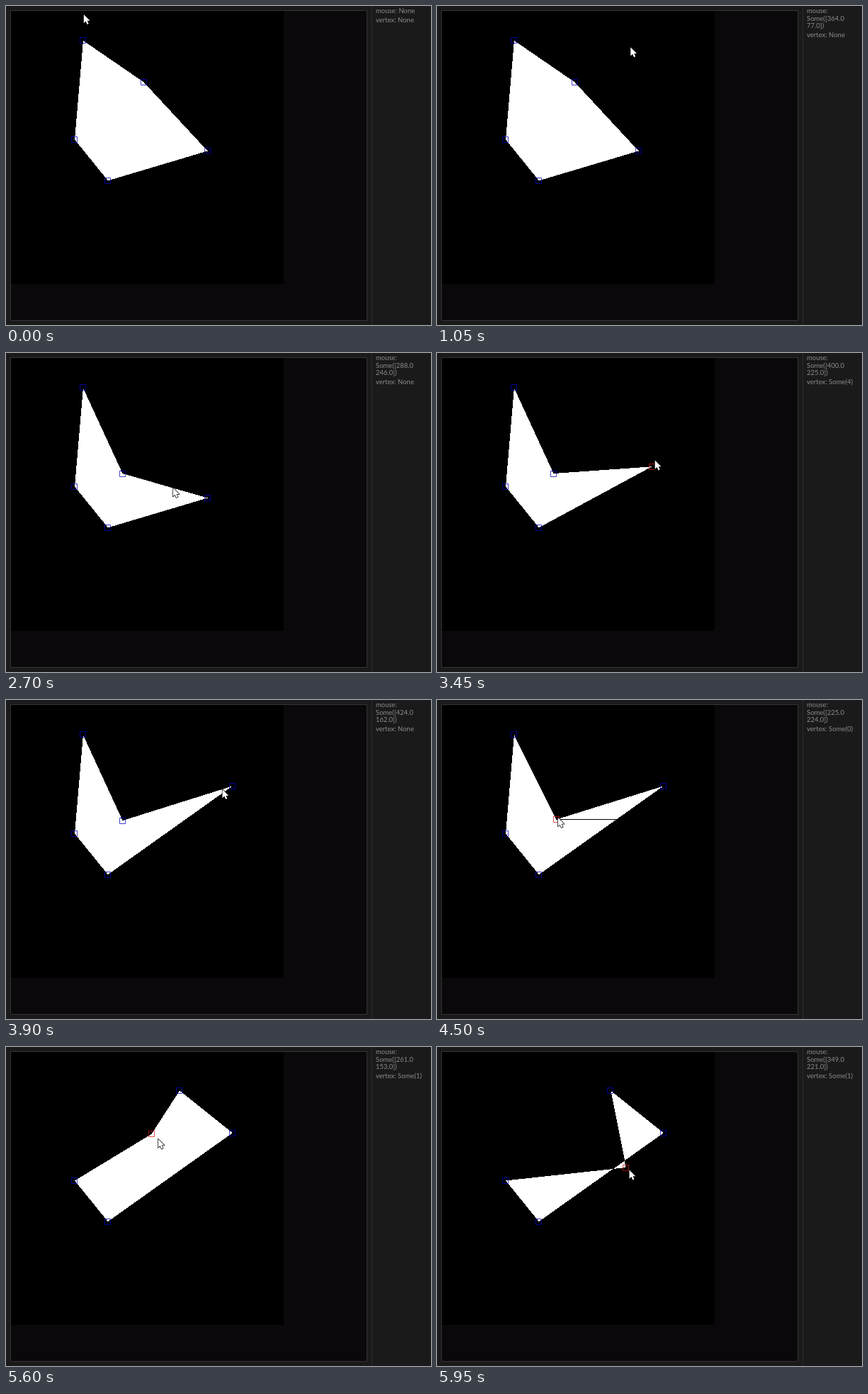
Write an HTML page with a canvas that moves like this. It is 600 by 450 pixels and loops after 6000 ms.

```html
<!DOCTYPE html>
<html lang="en">
<head>
<meta charset="utf-8">
<title>Polygon editor</title>
<style>
  html, body { margin: 0; width: 100%; height: 100%; overflow: hidden; background: #1b1a1b; }
  canvas { display: block; width: 600px; height: 450px; }
</style>
</head>
<body>
<canvas id="stage" width="600" height="450"></canvas>
<script>
const ctx = document.getElementById('stage').getContext('2d');
const LOOP = 6000, STEP = 50;
const VERTEX_LAG = 40, TEXT_LAG = 80;
const TEXT_START = 1050;
const UNIT = 0.75; // stage pixels per logical pixel

const CORNERS = [[195, 107], [109, 48], [97, 188], [144, 246], [285, 204]];
const HOME = [109.5, 11.5];

const linear = p => p;
const easeIn = p => p * p;
const easeOut = p => p * (2 - p);
const easeBoth = p => p * p * (3 - 2 * p);

// Pointer gestures; "grab" names the corner dragged along
const MOVES = [
  { at: 300, dur: 350, to: [210.5, 61.5], ease: easeBoth },
  { at: 760, dur: 90, to: [250, 71], ease: linear },
  { at: 951, dur: 15, to: [273, 57.75], ease: linear },
  { at: 1200, dur: 650, to: CORNERS[0], ease: easeBoth },
  { at: 1950, dur: 440, to: [165, 169.5], ease: easeIn, grab: 0 },
  { at: 2450, dur: 700, to: CORNERS[4], ease: easeOut },
  { at: 3250, dur: 500, to: [320, 121], ease: easeOut, grab: 4 },
  { at: 3780, dur: 620, to: [168.75, 168], ease: easeBoth },
  { at: 4450, dur: 330, to: [245, 61], ease: easeIn, grab: 0 },
  { at: 4810, dur: 140, to: [164, 79], ease: linear },
  { at: 4950, dur: 250, to: CORNERS[1], ease: easeOut },
  { at: 5230, dur: 1020, to: [286.6, 184.8], ease: easeOut, grab: 1 }
];

const ARROW = [[0, 0], [0, 12.2], [2.8, 9.6], [4.8, 14], [6.9, 13], [5, 8.8], [8.7, 8.8]];

function pointerAt(t) {
  let [x, y] = HOME;
  for (const { at, dur, to, ease } of MOVES) {
    if (t < at) break;
    const p = ease(Math.min(1, (t - at) / dur));
    x += (to[0] - x) * p;
    y += (to[1] - y) * p;
  }
  return [x, y];
}

const logical = v => Math.round(v / UNIT);

function stateAt(t) {
  const vertices = CORNERS.slice();
  let selected = null;
  for (const { at, dur, grab } of MOVES) {
    if (grab === undefined || t <= at) continue;
    const seen = Math.max(at, Math.min(t - VERTEX_LAG, at + dur));
    vertices[grab] = pointerAt(seen).map(v => logical(v) * UNIT);
    if (t < at + dur + VERTEX_LAG) selected = grab;
  }
  return { vertices, selected };
}

function rect(color, x, y, w, h) {
  ctx.fillStyle = color;
  ctx.fillRect(x, y, w, h);
}

function outline(color, x, y, w, h, weight = 1) {
  ctx.strokeStyle = color;
  ctx.lineWidth = weight;
  ctx.strokeRect(x + 0.5, y + 0.5, w, h);
}

function drawPanels() {
  rect('#1b1a1b', 0, 0, 600, 450);
  rect('#0a080a', 6, 6, 504, 438);
  rect('#000', 7, 7, 385, 385);
  outline('#353435', 6, 6, 503, 437);
  rect('#2d2c2d', 516, 0, 1, 450);
}

// Each distinct crossing counts once, so a row that touches a corner may stay open
function crossings(points, y) {
  const found = new Set();
  points.forEach(([x0, y0], i) => {
    const [x1, y1] = points[(i + 1) % points.length];
    if (y0 === y1 || y < Math.min(y0, y1) || y > Math.max(y0, y1)) return;
    found.add((x0 + (x1 - x0) * (y - y0) / (y1 - y0)).toFixed(2));
  });
  return [...found].map(Number).sort((a, b) => a - b);
}

function fillRows(points) {
  const ys = points.map(p => p[1]);
  for (let y = Math.ceil(Math.min(...ys)); y <= Math.max(...ys); y++) {
    const xs = crossings(points, y);
    for (let i = 0; i + 1 < xs.length; i += 2) {
      const left = Math.round(xs[i]);
      rect('#fff', left, y, Math.max(0, Math.floor(xs[i + 1]) - left), 1);
    }
  }
}

function drawPolygon({ vertices, selected }) {
  fillRows(vertices);
  vertices.forEach(([x, y], i) => {
    const color = i === selected ? '#d01414' : '#0000c0';
    outline(color, Math.round(x) - 5, Math.round(y) - 4, 8, 8, UNIT);
  });
}

function drawPointer(t) {
  const [x, y] = pointerAt(t);
  ctx.beginPath();
  for (const [dx, dy] of ARROW) ctx.lineTo(x + dx + 0.3, y + dy + 0.5);
  ctx.closePath();
  ctx.lineJoin = 'round';
  ctx.strokeStyle = '#000';
  ctx.lineWidth = 1.4;
  ctx.stroke();
  ctx.fillStyle = '#fff';
  ctx.fill();
}

function drawReadout(selected, t) {
  const [x, y] = pointerAt(t - TEXT_LAG).map(v => logical(v).toFixed(1));
  const mouse = t < TEXT_START ? ['mouse: None'] : ['mouse:', `Some([${x}`, `${y}])`];
  ctx.font = '9.5px Lato, sans-serif';
  ctx.fillStyle = '#8c8c8c';
  mouse.forEach((line, i) => ctx.fillText(line, 522, 10 + i * 10.5));
  const label = selected === null ? 'None' : `Some(${selected})`;
  ctx.fillText('vertex: ' + label, 522, 23 + (mouse.length - 1) * 10.5);
}

function draw(t) {
  const state = stateAt(t);
  drawPanels();
  drawPolygon(state);
  drawReadout(state.selected, t);
  drawPointer(t);
}

const begin = performance.now();
function tick() {
  const t = (performance.now() - begin) % LOOP;
  draw(Math.floor(t / STEP) * STEP);
  requestAnimationFrame(tick);
}
tick();
</script>
</body>
</html>
```
